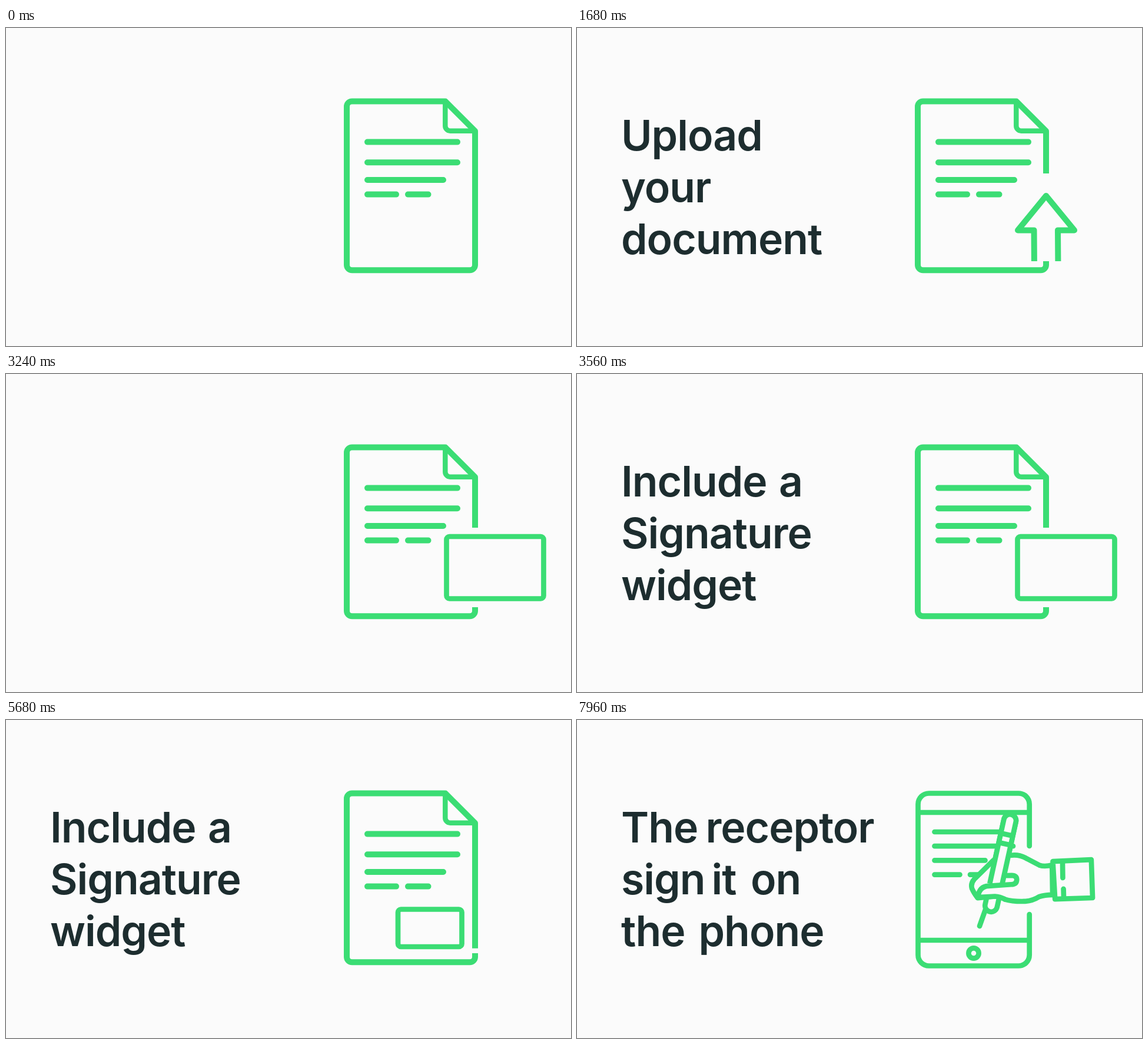
An HTML page that plays this animation: 960 px wide and 540 px high, repeating every 8 s.

```html
<!DOCTYPE html>
<html lang="en">
<head>
<meta charset="utf-8">
<title>Sign a document</title>
<style>
  html, body { margin: 0; width: 100%; height: 100%; overflow: hidden; background: #fbfbfb; }
  svg { display: block; width: 100vw; height: 100vh; }
  text { font: 600 71.5px Inter, "Open Sans", sans-serif; letter-spacing: -1px; fill: #1d2d2f; }
  .ink { fill: none; stroke: #3bdd74; stroke-width: 8.7; stroke-linejoin: round; }
  .round { stroke-linecap: round; }
  .solid { fill: #fbfbfb; }
  .bold { stroke-width: 10; }
</style>
</head>
<body>
<svg viewBox="0 0 960 540">
  <defs>
    <clipPath id="slot"><rect x="738" y="249" width="120" height="147"/></clipPath>
  </defs>

  <g id="title"></g>

  <g id="doc" class="ink bold">
    <path id="sheet"/>
    <path d="M746.3 124.5V166a8.5 8.5 0 0 0 8.5 8.7H797" stroke-width="8.5"/>
    <path class="round" d="M614 193.6H767M614 228.3H767M614 258H743M614 282.6H663M683 282.6H717.5"/>
  </g>

  <g id="upload" clip-path="url(#slot)">
    <path id="arrow" class="ink bold" d="M777 340L776.5 272.5H749L797 214L845 272.5H817L817.5 340Z"/>
  </g>

  <rect id="widget" class="ink"/>

  <g id="phone" class="ink">
    <path class="round" d="M768.7 214V143a18.5 18.5 0 0 0-18.5-18.5H598a18.5 18.5 0 0 0-18.5 18.5V399a18.5 18.5 0 0 0 18.5 18.5H750.2a18.5 18.5 0 0 0 18.5-18.5V330"/>
    <path d="M579.5 157H768.7M579.5 374H768.7"/>
    <circle cx="674" cy="396" r="8.6"/>
    <path class="round" d="M607.5 190H741M607.5 214.2H741M607.5 238.4H693.5M710.5 238.4H738M607.5 262.6H650.5M668 262.6H700"/>
    <path id="stroke" class="round"/>
    <g id="hand">
      <g transform="translate(757.5 204.4) rotate(28.2)">
        <rect class="solid" x="-10.4" y="-10.4" width="20.8" height="169" rx="10.4"/>
      </g>
      <path class="solid round" d="M712 262L672 284Q664 289 664 298Q665 306 669 316L698 321.5Q706 324 713 331Q724 338 743 343Q757 346.5 770 342.5Q780 342 793 345.5L806 296.5Q793 296.5 785 291L767 274Q757 264 744 262"/>
      <g transform="translate(757.5 204.4) rotate(28.2)">
        <path class="solid" d="M-10.4 112V0a10.4 10.4 0 0 1 20.8 0V112"/>
        <path d="M-10.4 24.5H10.4M-10.4 40.5H10.4"/>
      </g>
      <path class="solid" stroke="none" d="M727 293L735 295Q743 297.5 741.5 304Q739 312 730 309.5L692 301.5Q677 298 669.5 315L698 321.5L713 327"/>
      <path class="round" d="M727 293L735 295Q743 297.5 741.5 304Q739 312 730 309.5L692 301.5Q677 298 669.5 315L698 321.5Q706 324 713 331"/>
      <path class="solid" d="M808.8 291L872.5 306L857 369L795 353.7Z"/>
      <path class="round" d="M824 298L817.5 322.5M813.5 341L810.5 353"/>
    </g>
  </g>
</svg>
<script>
const LOOP = 8000, STEP = 40, LEFT = 75;
// each line: first word, then an optional rest with its own left edge
const scenes = [
  { at: 0, lines: [[["Upload", LEFT]], [["your", LEFT]], [["document", LEFT]]] },
  { at: 3240, lines: [[["Include", LEFT], ["a", 343]], [["Signature", LEFT]], [["widget", LEFT]]] },
  { at: 6480, lines: [
    [["The", LEFT], ["receptor", 218.5]],
    [["sign", LEFT], ["it", 228.5], ["on", 295]],
    [["the", LEFT], ["phone", 206.5]]
  ] }
];

const el = id => document.getElementById(id);
const set = (id, attrs) => {
  for (const k in attrs) el(id).setAttribute(k, attrs[k]);
};
const show = (id, on) => set(id, { display: on ? "inline" : "none" });
const mix = (a, b, p) => a + (b - a) * p;
const span = (t, a, b) => Math.min(1, Math.max(0, (t - a) / (b - a)));
const smooth = p => p * p * (3 - 2 * p);
const cubic = p => p < .5 ? 4 * p ** 3 : 1 - 4 * (1 - p) ** 3;

// y where the right edge of the sheet stops; the edge resumes at 396
function edgeEnd(t, scene) {
  if (scene === 0) {
    return t < 1560 ? mix(396, 248, smooth(span(t, 700, 1560)))
                    : mix(248, 237, span(t, 1560, 2840));
  }
  return mix(261, 397, cubic(span(t, 4520, 6080)));
}

function drawSheet(y) {
  set("sheet", { d: "M797 396V402.3a9 9 0 0 1-9 9H588a9 9 0 0 1-9-9V133.5" +
    `a9 9 0 0 1 9-9H746.5L797 175V${y}` });
}

function drawArrow(t) {
  const rise = mix(190, 0, smooth(span(t, 720, 2360)));
  const settle = mix(0, 43, smooth(span(t, 2360, 2840)));
  set("arrow", { transform: `translate(0 ${rise + settle})` });
}

function drawWidget(t) {
  const p = cubic(span(t, 4480, 5720));
  set("widget", {
    x: mix(748.5, 666, p), y: mix(276, 321.5, p),
    width: mix(165, 108.5, p), height: mix(105.5, 63.5, p),
    rx: 5, "stroke-width": mix(9.4, 9, p)
  });
}

function drawHand(t) {
  const s = t - 7520;
  const turn = s > 0 ? -22 * Math.sin(Math.PI * s / 590) : 0;
  const p = span(t, 7560, 7800);
  set("hand", { transform: `rotate(${turn} 624.6 266.7)` });
  show("stroke", p > 0);
  set("stroke", { d: `M684 350L${mix(684, 695, p)} ${mix(350, 319, p)}` });
}

function drawTitle(scene, age) {
  const title = el("title");
  if (title.dataset.scene !== String(scene)) {
    title.dataset.scene = scene;
    title.innerHTML = scenes[scene].lines.map((words, i) =>
      `<text y="${208 + 88 * i}">` +
      words.map(([word, x]) => `<tspan x="${x}">${word}</tspan>`).join(" ") +
      "</text>").join("");
  }
  set("title", { opacity: span(age, 120, 320) });
}

function draw(now) {
  const t = Math.floor(now % LOOP / STEP) * STEP;
  const scene = t < scenes[1].at ? 0 : t < scenes[2].at ? 1 : 2;
  drawTitle(scene, t - scenes[scene].at);
  show("doc", scene < 2);
  show("upload", scene === 0);
  show("widget", scene === 1);
  show("phone", scene === 2);
  if (scene < 2) drawSheet(edgeEnd(t, scene));
  if (scene === 0) drawArrow(t);
  if (scene === 1) drawWidget(t);
  if (scene === 2) drawHand(t);
}

let start;
function tick(now) {
  start ??= now;
  draw(now - start);
  requestAnimationFrame(tick);
}
draw(0);
requestAnimationFrame(tick);
</script>
</body>
</html>
```
